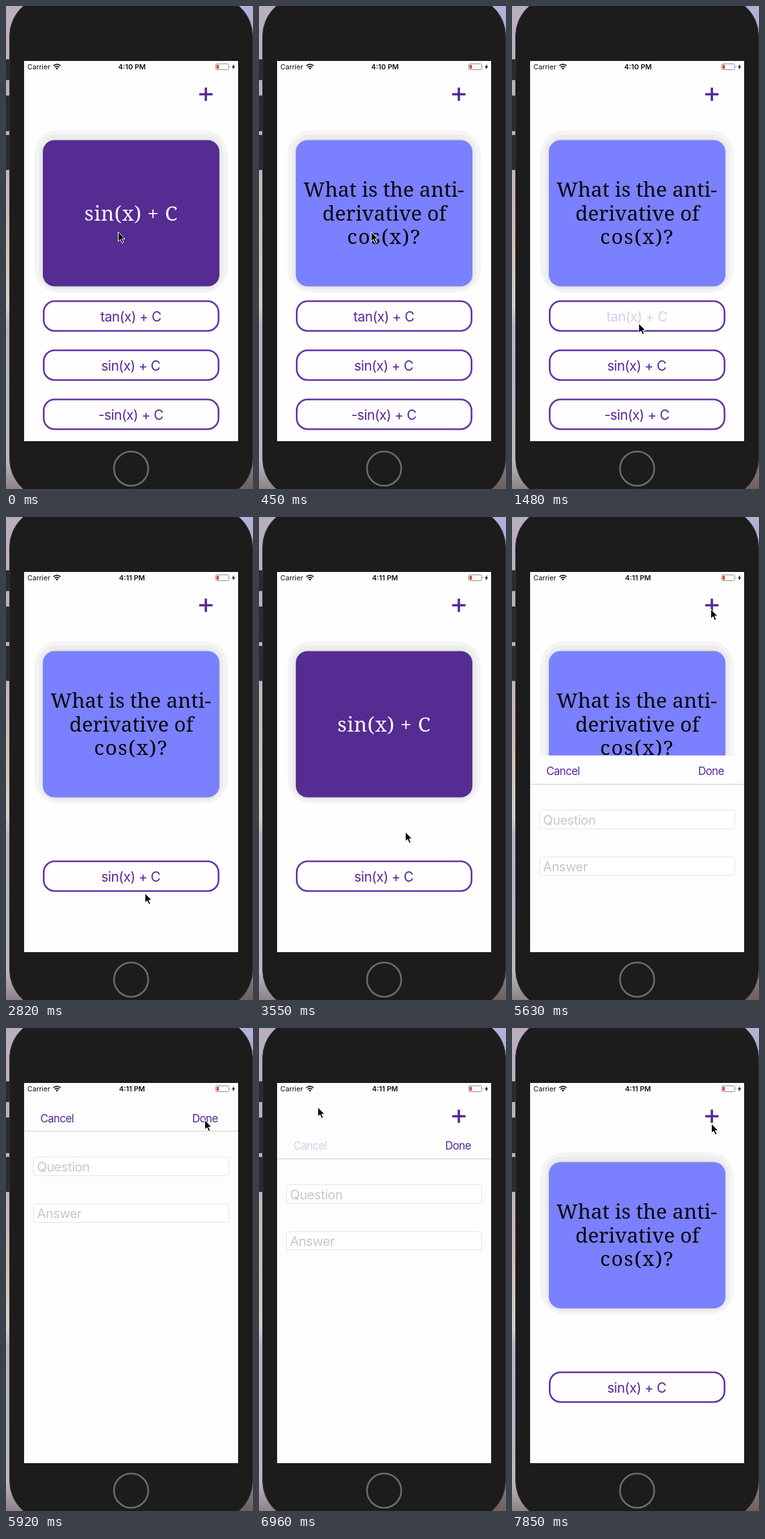
An HTML page that plays this animation: 382x747 px, repeating every 8 s.

```html
<!DOCTYPE html>
<html lang="en">
<head>
<meta charset="utf-8">
<title>Flashcards</title>
<style>
  html, body { margin: 0; width: 100%; height: 100%; overflow: hidden; background: #c4c0ca; }
  svg { display: block; width: 100%; height: 100%; }
  text { font-family: Inter, Roboto, sans-serif; fill: #57289b; }
  .card text { font-family: "Noto Serif", serif; font-size: 31.6px; text-anchor: middle; }
  .card #question text { fill: #050507; }
  .card #answer { fill: #fff; letter-spacing: .6px; }
  .card .formula { letter-spacing: 1.6px; }
  .choice rect { fill: #fefefe; stroke: #6233a5; stroke-width: 2.6; }
  .choice text { font-size: 21px; letter-spacing: -.5px; text-anchor: middle; }
  .nav { font-size: 17px; letter-spacing: -.7px; }
  .field rect { fill: #fff; stroke: #e3e3e5; }
  .field text { font-size: 20px; letter-spacing: -.4px; fill: #c7c7cb; }
  .status text { font-size: 10.8px; fill: #111; }
  .status #clock { font-size: 11px; font-weight: 600; text-anchor: middle; }
</style>
</head>
<body>
<svg viewBox="0 0 382 747" preserveAspectRatio="none">
  <defs>
    <linearGradient id="left" x2="0" y2="1">
      <stop offset="0" stop-color="#b9aebe"/>
      <stop offset=".3" stop-color="#bdb4bd"/>
      <stop offset=".5" stop-color="#cfc4b8"/>
      <stop offset=".62" stop-color="#d3d2cc"/>
      <stop offset=".66" stop-color="#b7b7c4"/>
      <stop offset=".94" stop-color="#bdb8c0"/>
      <stop offset="1" stop-color="#8d8286"/>
    </linearGradient>
    <linearGradient id="right" x2="0" y2="1">
      <stop offset="0" stop-color="#b0b3d6"/>
      <stop offset=".5" stop-color="#8589a4"/>
      <stop offset=".93" stop-color="#8c8490"/>
      <stop offset="1" stop-color="#6f5f5e"/>
    </linearGradient>
    <clipPath id="screen"><rect x="28" y="85" width="331" height="588"/></clipPath>
  </defs>

  <rect width="191" height="747" fill="url(#left)"/>
  <rect x="191" width="191" height="747" fill="url(#right)"/>
  <g fill="#2a2a2b" stroke="#111" stroke-width=".8">
    <rect x="-3" y="83" width="12" height="31" rx="2"/>
    <rect x="-3" y="139" width="12" height="54" rx="2"/>
    <rect x="-3" y="200" width="12" height="53" rx="2"/>
  </g>
  <rect x="5.5" y="-15" width="376" height="777" rx="62" fill="#1c1c1c" stroke="#363638"/>
  <circle cx="193.5" cy="715.5" r="26.5" fill="none" stroke="#6c6c6c" stroke-width="2.6"/>
  <rect x="28" y="85" width="331" height="588" fill="#fefefe"/>

  <g clip-path="url(#screen)">
    <path id="plus" d="M298.8 136.5h20.6M309.1 126.2v20.6" stroke="#55279a" stroke-width="3.6"/>

    <g class="card">
      <rect x="44" y="192" width="299" height="251" rx="37" fill="#f4f4f4"/>
      <rect x="51" y="199" width="285" height="239" rx="27" fill="#ececec"/>
      <rect x="55.5" y="205.5" width="276" height="229.5" rx="21" fill="#dedee2"/>
      <rect id="face" x="57" y="207.5" width="273" height="226" rx="18"/>
      <g id="question">
        <text x="193" y="294.5">What is the anti-</text>
        <text x="194" y="331.5">derivative of</text>
        <text class="formula" x="193.5" y="368">cos(x)?</text>
      </g>
      <text id="answer" x="193.5" y="331.5">sin(x) + C</text>
    </g>

    <g id="choices"></g>

    <g id="modal">
      <rect x="28" y="115" width="331" height="660" fill="#fdfdfd"/>
      <text class="nav" id="cancel" x="53" y="145.5">Cancel</text>
      <text class="nav" x="288" y="145.5">Done</text>
      <path d="M28 159.5h331" stroke="#cfcfd1"/>
      <g class="field">
        <rect x="42.5" y="199.5" width="302" height="29" rx="4"/>
        <text x="48" y="222">Question</text>
        <rect x="42.5" y="272" width="302" height="28.5" rx="4"/>
        <text x="48" y="294">Answer</text>
      </g>
    </g>
  </g>

  <g class="status">
    <text x="33" y="98">Carrier</text>
    <text id="clock" x="194.8" y="98"></text>
    <path d="M73.2 92.4q5.6-4.6 11.2 0M75.2 94.7q3.6-2.8 7.2 0" fill="none" stroke="#111" stroke-width="1.7"/>
    <path d="M76.8 96.2q2-1.4 4 0l-2 2.2z" fill="#111"/>
    <rect x="324.2" y="89.5" width="20.3" height="9" rx="2" fill="none" stroke="#8f8f8f"/>
    <rect x="325.6" y="91" width="3.6" height="6" rx=".6" fill="#f23a30"/>
    <path d="M346 92.4q1.6 1.6 0 3.2z" fill="#8f8f8f"/>
    <path d="M353 90l-4 4.6h2.4l-1 3.6 4.2-4.8h-2.5z" fill="#111"/>
  </g>

  <path id="cursor" d="M0 0V14.6L3.4 11.5 5.9 17.2 8.4 16.1 5.9 10.6H10.4Z"
    fill="#000" stroke="#fff" stroke-width="1" stroke-linejoin="round"/>
</svg>
<script>
const LOOP = 8000, STEP = LOOP / 54;
const $ = id => document.getElementById(id);

// [time, x, y] of the pointer tip
const path = [
  [0, 173.5, 349.5], [600, 173.5, 349.5], [960, 179, 392], [1330, 196, 491],
  [1635, 196, 491], [1775, 201, 562], [1925, 200.5, 625.5], [2540, 200.5, 625.5],
  [2815, 215, 582], [3110, 217, 559.5], [3410, 217, 559.5], [3550, 226, 490],
  [3850, 249.5, 334.5], [4450, 249.5, 334.5], [4590, 268, 290], [4740, 308, 222],
  [4885, 323, 165], [5030, 307.5, 142.5], [6080, 307.5, 142.5], [6370, 205, 134],
  [6660, 91, 122.5], [7120, 91, 122.5], [7400, 170, 130], [7850, 308.5, 148], [LOOP, 308.5, 148]
];

const choices = [
  { label: 'tan(x) + C', y: 456.5, press: [1320, 1620], hide: 1620 },
  { label: 'sin(x) + C', y: 532.5, press: [3250, 3540] },
  { label: '-sin(x) + C', y: 608.5, press: [2360, 2510], hide: 2510 }
];
$('choices').innerHTML = choices.map(c => `<g class="choice">
  <rect x="58.3" y="${c.y}" width="270.4" height="46" rx="17"/>
  <text x="193" y="${c.y + 31}">${c.label}</text></g>`).join('');
choices.forEach((c, i) => c.el = $('choices').children[i]);

const within = (t, a, b) => t >= a && t < b;
const show = (el, on) => el.setAttribute('visibility', on ? 'visible' : 'hidden');
const fade = (el, on) => el.setAttribute('opacity', on ? 0.22 : 1);
const move = (el, x, y) => el.setAttribute('transform', `translate(${x} ${y})`);
const ease = (t, start, span) => {
  const u = Math.min(1, Math.max(0, (t - start) / span));
  return u * u * (3 - 2 * u);
};

function pointer(t) {
  const i = Math.max(1, path.findIndex(p => p[0] >= t));
  const [a, b] = [path[i - 1], path[i]];
  const u = (t - a[0]) / (b[0] - a[0]);
  return [a[1] + (b[1] - a[1]) * u, a[2] + (b[2] - a[2]) * u];
}

function draw(time) {
  const t = Math.floor((time % LOOP + 10) / STEP) * STEP % LOOP;

  const flipped = t < 440 || within(t, 3390, 4285);
  $('face').setAttribute('fill', flipped ? '#552c92' : '#7a80fe');
  show($('answer'), flipped);
  show($('question'), !flipped);

  for (const c of choices) {
    show(c.el, !(t >= c.hide));
    fade(c.el.lastElementChild, within(t, ...c.press));
  }
  $('clock').textContent = t < 1620 ? '4:10 PM' : '4:11 PM';
  fade($('plus'), within(t, 5320, 5600));
  fade($('cancel'), t > 6800);

  const lift = ease(t, 5425, 375) - ease(t, 6901, 375);
  move($('modal'), 0, 588 * (1 - lift));
  show($('modal'), lift > 0);
  move($('cursor'), ...pointer(t));
}

let start;
function tick(now) {
  start ??= now;
  draw(now - start);
  requestAnimationFrame(tick);
}
draw(0);
requestAnimationFrame(tick);
</script>
</body>
</html>
```
